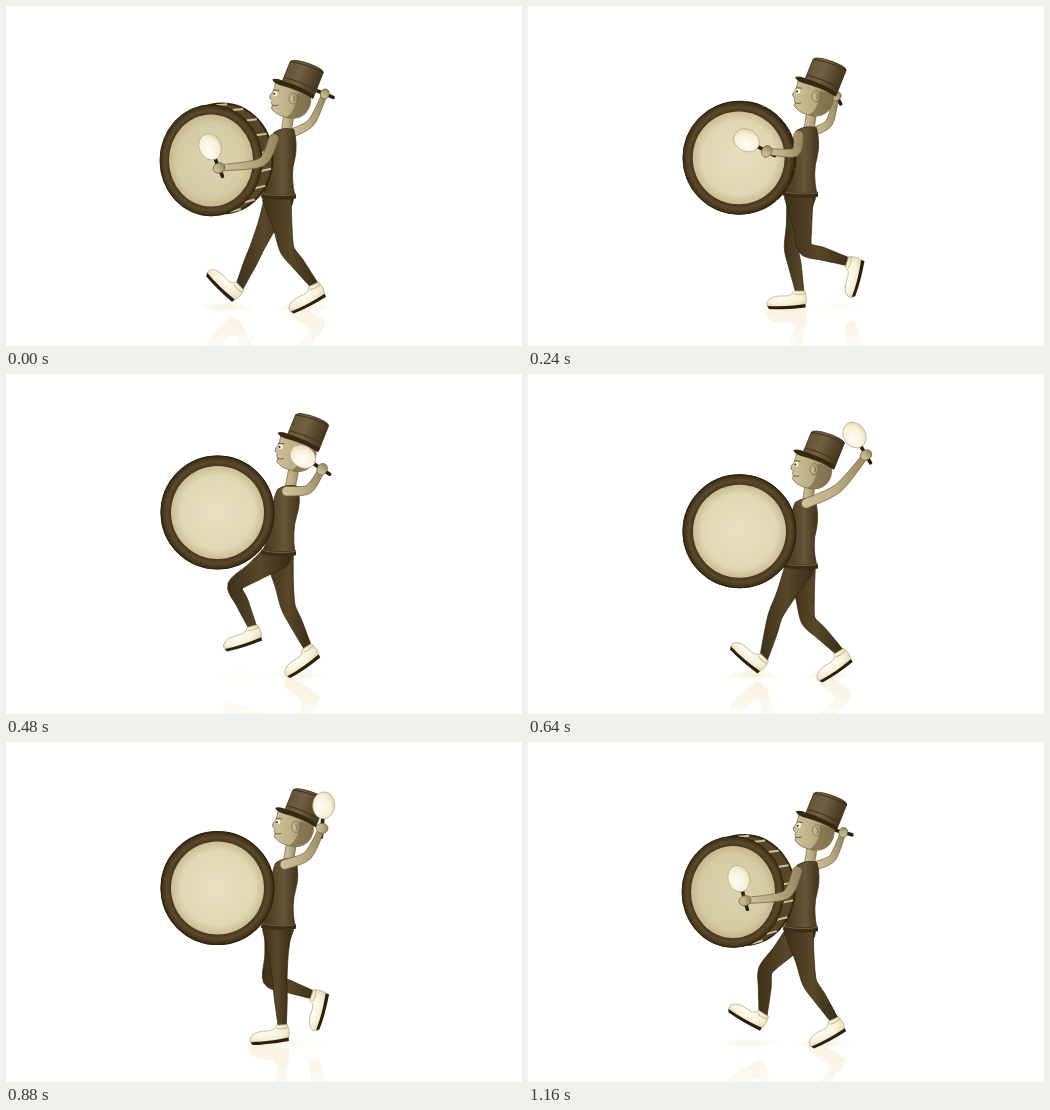
Recreate the animation shown at these times as an HTML page. Size 516 by 340 pixels, loop 1.2 s.

```html
<!DOCTYPE html>
<html lang="en">
<head>
<meta charset="utf-8">
<title>Marching drummer</title>
<style>
html, body { margin: 0; width: 100%; height: 100%; overflow: hidden; background: #fff; }
svg { display: block; width: 516px; height: 340px; }
.skin { fill: url(#skin); stroke: #6d5f3c; stroke-width: .7; }
.cloth { fill: url(#cloth); stroke: #392c15; stroke-width: .7; }
.pants { fill: url(#pants); stroke: #30240f; stroke-width: .7; }
.white { fill: url(#white); stroke: #b9ab80; stroke-width: .7; }
.grip { stroke: #2b2010; stroke-width: 3.6; stroke-linecap: round; }
</style>
</head>
<body>
<svg viewBox="0 0 516 340">
  <defs>
    <linearGradient id="skin">
      <stop offset="0" stop-color="#cfc39c"/><stop offset=".5" stop-color="#bbae84"/>
      <stop offset="1" stop-color="#94865c"/>
    </linearGradient>
    <linearGradient id="cloth">
      <stop offset="0" stop-color="#43351a"/><stop offset=".6" stop-color="#66563a"/>
      <stop offset="1" stop-color="#43351a"/>
    </linearGradient>
    <linearGradient id="pants">
      <stop offset="0" stop-color="#3d3018"/><stop offset=".5" stop-color="#584829"/>
      <stop offset="1" stop-color="#392c15"/>
    </linearGradient>
    <linearGradient id="hatFill" x2="1" y2=".35">
      <stop offset="0" stop-color="#5c4c2e"/><stop offset=".5" stop-color="#716143"/>
      <stop offset="1" stop-color="#43351b"/>
    </linearGradient>
    <radialGradient id="white" cx=".42" cy=".35" r=".75">
      <stop offset="0" stop-color="#fffef6"/><stop offset=".6" stop-color="#f8f1d9"/>
      <stop offset="1" stop-color="#d8cca4"/>
    </radialGradient>
    <radialGradient id="skinHead">
      <stop offset="0" stop-color="#e8e1c2"/><stop offset=".8" stop-color="#e0d8b5"/>
      <stop offset="1" stop-color="#cabe93"/>
    </radialGradient>
    <radialGradient id="rim">
      <stop offset=".8" stop-color="#3e3118"/><stop offset=".9" stop-color="#5a4a2b"/>
      <stop offset="1" stop-color="#3a2d15"/>
    </radialGradient>
    <radialGradient id="glow">
      <stop offset="0" stop-color="#f1dca6" stop-opacity=".5"/>
      <stop offset="1" stop-color="#f1dca6" stop-opacity="0"/>
    </radialGradient>
    <linearGradient id="fade" gradientUnits="userSpaceOnUse" x1="0" y1="303" x2="0" y2="342">
      <stop offset="0" stop-color="#fff"/><stop offset="1" stop-color="#777"/>
    </linearGradient>
    <mask id="floor" maskUnits="userSpaceOnUse" x="0" y="303" width="516" height="37">
      <rect y="303" width="516" height="37" fill="url(#fade)"/>
    </mask>
    <filter id="warm" color-interpolation-filters="sRGB">
      <feColorMatrix values="0 0 0 0 .94  0 0 0 0 .84  0 0 0 0 .6  0 0 0 .3 0"/>
      <feGaussianBlur stdDeviation=".7"/>
    </filter>
    <g id="shoe">
      <path class="white" d="M-6-2Q-8 3 -14 3Q-30 2 -33 9Q-34 14 -31 15L5 13Q8 6 5-2Z"/>
      <path d="M-32.500 13Q-14 14 5.500 11L5.500 14.500Q-14 17 -31 16Z" fill="#2b2010"/>
      <path d="M-6 1Q0 3 5.500 .5" fill="none" stroke="#c6b98f"/>
    </g>
  </defs>
  <ellipse id="farGlow" cy="301" rx="30" ry="5" fill="url(#glow)"/>
  <ellipse id="nearGlow" cy="301" rx="30" ry="5" fill="url(#glow)"/>
  <g mask="url(#floor)">
    <g filter="url(#warm)"><use href="#legs" transform="matrix(1 0 0 -1 0 606)"/></g>
  </g>

  <g id="farArm">
    <line class="grip"/><ellipse class="white" rx="12" ry="9.500"/>
    <path class="skin"/><ellipse class="skin" rx="5" ry="4.400"/>
  </g>
  <g id="legs">
    <path id="farLeg" class="pants"/><use id="farShoe" href="#shoe"/>
    <path id="nearLeg" class="pants"/><use id="nearShoe" href="#shoe"/>
  </g>
  <path id="neck" class="skin"/>
  <path id="torso" class="cloth"/>
  <g id="belt">
    <path d="M255.500 186Q273 190 290 187L290 192Q273 195 255 191Z" fill="#3b2e16"/>
    <path d="M256 187Q273 191 290 188" fill="none" stroke="#7b6b48" stroke-width=".8"/>
  </g>
  <g id="head">
    <path class="skin" d="M269 76L304 89Q306 99 299 107Q291 114 281 111Q271 109 267 104Q264 102 266 98.500L265 96L266 94Q262 92 264 88.500Q268 85 269 76Z"/>
    <path d="M291 86L304 90Q305 100 298 107Q291 113 280 111Q290 104 291 86Z" fill="#6f6140" opacity=".6"/>
    <ellipse class="skin" cx="287" cy="92" rx="4.300" ry="5.500"/>
    <path d="M286 89Q290 91 287 95" fill="none" stroke="#77694a"/>
    <ellipse cx="269" cy="87" rx="2.200" ry="2.400" fill="#fffdf0"/>
    <circle cx="268" cy="87.300" r="1" fill="#2b2010"/>
    <path d="M267 83.500L273 84M266 98.500Q269 100 272 98.500" fill="none" stroke="#6d5f3c"/>
    <path d="M284 55Q287 52 301 56.500Q317 62 317 66L307 91Q292 81 275 77Z" fill="url(#hatFill)" stroke="#392c15" stroke-width=".8"/>
    <path d="M284 55Q302 58 317 66M278 71Q295 75 309.500 84" fill="none" stroke="#3d3018"/>
    <path d="M266 73Q270 71 277 74.500Q293 79 308 88.500L306.500 92.500Q292 83 273 78.500Q267 76 266 73Z" fill="#352914"/>
  </g>
  <g id="drum">
    <ellipse id="back" fill="#57472a" stroke="#33270f" stroke-width="2"/>
    <path id="rods" stroke="#cbbf96" stroke-width="2" fill="none"/>
    <ellipse id="hoop" fill="url(#rim)" stroke="#2f240f"/>
    <ellipse id="skinFace" fill="url(#skinHead)"/>
    <ellipse id="shade" fill="#b5a673"/>
  </g>
  <g id="nearArm">
    <line class="grip"/><ellipse class="white" rx="13.500" ry="11"/>
    <path class="skin"/><ellipse class="skin" rx="6" ry="5"/>
  </g>
</svg>
<script>
const LOOP = 1200, STEP = 600, TICK = 40, TURN = 2 * Math.PI;
const THIGH = 52, SHIN = 46;
const $ = id => document.getElementById(id);
const set = (el, attrs) => { for (const k in attrs) el.setAttribute(k, attrs[k]); };
const mix = (a, b, u) => a + (b - a) * u;
const mixPoint = (a, b, u) => a.map((v, k) => mix(v, b[k], u));
const clamp = v => Math.min(1, Math.max(0, v));

// evenly spaced poses of one foot: ankle x, ankle y, tilt
const stride = [
  [233, 282, 47], [248, 286, 17], [272, 287, 0], [283, 279, -12], [302, 274, -32],
  [309, 280, -25], [319, 272, -52], [321, 256, -73], [272, 251, -60], [247, 254, -15]
];

// ends of each arm's swing, from drum beat to raised
const arms = {
  near: { shoulder: [[268, 132], [279, 127]], hand: [[213, 162], [338, 81]], twist: -120, reach: 23, size: 1 },
  far: { shoulder: [[280, 128], [288, 126]], hand: [[217, 162], [320, 87]], twist: -150, reach: 21, size: .85 }
};

const hermite = (a, b, ma, mb, u) => {
  const v = u * u, w = v * u;
  return a * (2 * w - 3 * v + 1) + b * (3 * v - 2 * w) + ma * (w - 2 * v + u) + mb * (w - v);
};

function footAt(time) {
  const n = stride.length, s = time / LOOP * n, i = Math.floor(s);
  const [a, b, c, d] = [-1, 0, 1, 2].map(k => stride[(i + k + n) % n]);
  return b.map((_, k) => hermite(b[k], c[k], (c[k] - a[k]) / 2, (d[k] - b[k]) / 2, s - i));
}

// rounded, tapered outline around a bent centre line of [x, y, radius]
function limb(pts) {
  const line = [], last = pts.length - 1;
  for (let i = 0; i < last; i++) {
    const a = pts[Math.max(0, i - 1)], b = pts[i], c = pts[i + 1], d = pts[Math.min(last, i + 2)];
    for (let j = i ? 1 : 0; j <= 6; j++)
      line.push(b.map((_, k) => hermite(b[k], c[k], (c[k] - a[k]) * .4, (d[k] - b[k]) * .4, j / 6)));
  }
  const left = [], right = [];
  line.forEach(([x, y, r], i) => {
    const p = line[Math.max(0, i - 1)], q = line[Math.min(line.length - 1, i + 1)];
    const dx = q[0] - p[0], dy = q[1] - p[1], s = r / (Math.hypot(dx, dy) || 1);
    left.push([x - dy * s, y + dx * s]);
    right.unshift([x + dy * s, y - dx * s]);
  });
  const run = list => list.map(p => p.map(v => v.toFixed(2)).join(" ")).join("L");
  const cap = (r, p) => `A${r} ${r} 0 0 0 ${p.map(v => v.toFixed(2)).join(" ")}`;
  return `M${run(left)}${cap(pts[last][2], right[0])}L${run(right)}${cap(pts[0][2], left[0])}Z`;
}

// knee that joins hip and ankle, bending forwards
function kneeAt([hx, hy], [ax, ay]) {
  const dx = ax - hx, dy = ay - hy, d = Math.hypot(dx, dy);
  if (d >= THIGH + SHIN) return mixPoint([hx, hy], [ax, ay], THIGH / (THIGH + SHIN));
  const along = (THIGH ** 2 - SHIN ** 2 + d * d) / (2 * d);
  const out = Math.sqrt(THIGH ** 2 - along ** 2);
  return [hx + (dx * along - dy * out) / d, hy + (dy * along + dx * out) / d];
}

function drawLeg(side, time, hip) {
  const [ax, ay, tilt] = footAt(time % LOOP);
  const ankle = [ax, ay], knee = kneeAt(hip, ankle);
  set($(side + "Leg"), { d: limb([
    [...hip, 14.5], [...mixPoint(hip, knee, .55), 9.5], [...knee, 7.2],
    [...mixPoint(knee, ankle, .4), 6.4], [...ankle, 4]
  ]) });
  set($(side + "Shoe"), { transform: `translate(${ax} ${ay}) rotate(${tilt})` });
  set($(side + "Glow"), { cx: ax - 12, opacity: clamp(1 - (288 - ay) / 45) });
}

// slow lift, held high, then a quick drop onto the drum
function drawArm(side, time, chestX, by) {
  const { shoulder, hand, twist, reach, size } = arms[side];
  const p = (time - 40) / LOOP, wave = Math.sin(TURN * p), drop = Math.max(0, -wave);
  const lift = clamp(.47 - .53 * Math.cos(TURN * (p - .07 * drop)));
  const [sx, sy] = mixPoint(...shoulder, lift).map((v, k) => v + (k ? by : chestX));
  let [hx, hy] = mixPoint(...hand, lift);
  hy -= 18 * drop * Math.sin(Math.PI * lift);
  const tilt = twist - 36 * wave, a = tilt * Math.PI / 180, c = Math.cos(a), s = Math.sin(a);
  const elbow = [(sx + hx) / 2 + 15 - 13 * lift, (sy + hy) / 2 + 9];

  const [grip, mallet, arm, fist] = $(side + "Arm").children;
  const mx = hx + c * reach, my = hy + s * reach;
  set(grip, { x1: mx, y1: my, x2: hx - c * 9, y2: hy - s * 9 });
  set(mallet, { transform: `translate(${mx} ${my}) rotate(${tilt})` });
  set(arm, { d: limb([[sx, sy, 4.8 * size], [...elbow, 4.3 * size], [hx, hy, 3 * size]]) });
  set(fist, { transform: `translate(${hx} ${hy}) rotate(${tilt + 90})` });
}

function drawDrum(k, dy) {
  const cx = 211.5 - 6.5 * k, cy = 155 + dy, rx = 56.5 - 5.5 * k, ry = 56.5 - k;
  const bx = cx + 11 * k, by = cy - 2 * k;
  set($("back"), { cx: bx, cy: by, rx: rx - .5, ry: ry - .5 });
  let d = "";
  for (let deg = -84; deg < 75; deg += 19) {
    const a = deg * Math.PI / 180, c = Math.cos(a), s = Math.sin(a);
    d += `M${cx + rx * c} ${cy + ry * s}L${bx + (rx - 1) * c} ${by + (ry - 1) * s}`;
  }
  set($("rods"), { d, opacity: k > .1 ? 1 : 0 });
  set($("hoop"), { cx, cy, rx, ry });
  const face = { cx, cy, rx: 46.5 - 4.5 * k, ry: 46.5 - .5 * k };
  set($("skinFace"), face);
  set($("shade"), { ...face, opacity: .25 * k });
}

function draw(t) {
  const w = TURN * t / STEP;
  const bob = 12.2 * Math.cos(w - 1.12) + 1.7 * Math.cos(2 * w + 1.05) - 5.6;
  const by = .75 * bob, cx = -.25 * bob, mid = cx / 2;
  const hx = .5 - .36 * bob, hy = bob;

  drawLeg("far", t, [273, 192 + by]);
  drawLeg("near", t + STEP, [271, 192 + by]);
  drawArm("far", t + STEP, cx, by);
  drawArm("near", t, cx, by);
  set($("neck"), { d: limb([[283 + hx, 105 + hy, 5], [280.5 + cx, 125 + by, 5]]) });

  const p = (x, y, dx) => `${x + dx} ${y + by}`;
  set($("torso"), { d:
    `M${p(268, 126, cx)}Q${p(277, 120, cx)} ${p(288, 123, cx)}` +
    `Q${p(292, 138, cx)} ${p(289, 152, mid)}Q${p(284, 168, mid)} ${p(289, 190, 0)}` +
    `L${p(256, 190, 0)}Q${p(263, 168, mid)} ${p(265, 150, mid)}Q${p(263, 136, cx)} ${p(268, 126, cx)}Z` });
  set($("belt"), { transform: `translate(0 ${by})` });
  set($("head"), { transform: `translate(${hx} ${hy})` });

  const facing = clamp((Math.cos(TURN * (t - 50) / LOOP) - .45) / .43);
  drawDrum(facing * facing * (3 - 2 * facing), 1.08 * bob - 1.2);
}

const start = performance.now();
function frame() {
  const t = (performance.now() - start) % LOOP;
  draw(Math.floor(t / TICK) * TICK);
  requestAnimationFrame(frame);
}
frame();
</script>
</body>
</html>
```
